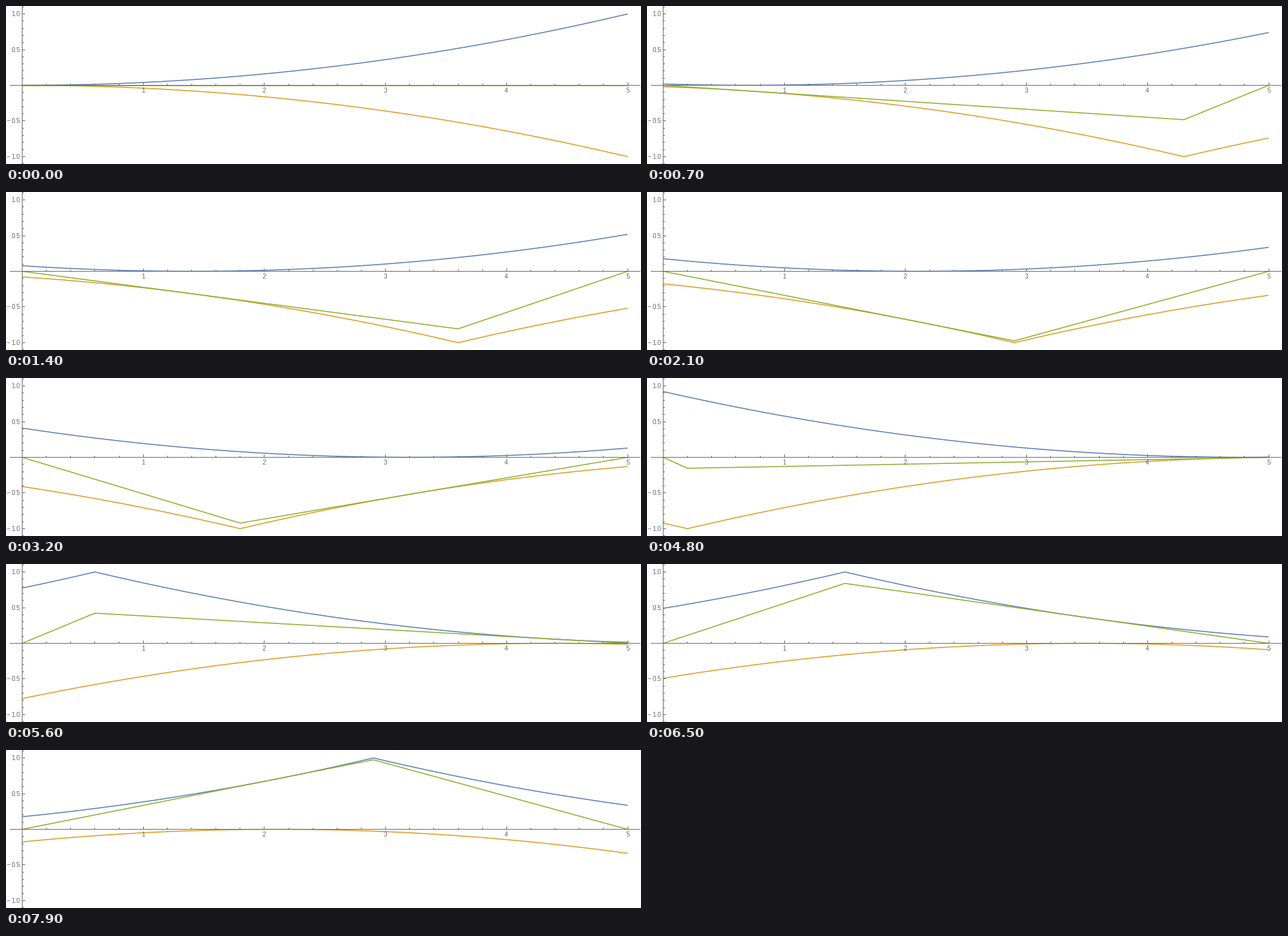
Animation of 1000x250 px, one loop 8 s. Source, as a matplotlib script:

```python
import numpy as np
import matplotlib.pyplot as plt
from matplotlib.animation import FuncAnimation

W, H, DPI = 1000, 250, 100
FRAMES, INTERVAL = 80, 100
LENGTH = 5
X0, Y0, XUNIT, YUNIT = 25.5, 125.5, 190.7, 112.9
PX = 72 / DPI
GREY = "#666666"
COLORS = ["#5e81b5", "#e19c24", "#8fb032"]  # right-going, left-going, sum

fig = plt.figure(figsize=(W / DPI, H / DPI), dpi=DPI, facecolor="white")
ax = fig.add_axes([0, 0, 1, 1])
ax.set_xlim(0, W)
ax.set_ylim(H, 0)
ax.axis("off")


def px(x):
    return X0 + XUNIT * x


def py(y):
    return Y0 - YUNIT * y


def mid(v):
    """Centre of the pixel holding v, for crisp hairlines."""
    return np.floor(v) + 0.5


def hairline(xs, ys):
    ax.plot(xs, ys, color=GREY, lw=PX, solid_capstyle="butt", snap=False, zorder=3)


def label(x, y, text, ha):
    ax.text(x, y, text, ha=ha, va="baseline", color=GREY, zorder=4,
            family="Liberation Sans", fontsize=10 * PX)


def draw_axes():
    hairline([6, 999], [mid(Y0)] * 2)
    hairline([mid(X0)] * 2, [0, H])
    for i in range(1, 26):
        major = i % 5 == 0
        x = mid(px(i / 5))
        hairline([x, x], [121 if major else 123, 125])
        if major:
            label(x - 0.5, 137, str(i // 5), "center")
    for i in range(-11, 12):
        if i == 0:
            continue
        major = i % 5 == 0
        y = mid(py(i / 10))
        hairline([26, 30 if major else 28], [y, y])
        if major:
            label(22.5, y + 3.5, f"{abs(i) / 10:.1f}", "right")
            if i < 0:
                label(6.5, y + 3.5, "\u2212", "right")


def wave(u):
    """Parabola (u/L)^2 repeated with period 2L."""
    u = (u + LENGTH) % (2 * LENGTH) - LENGTH
    return (u / LENGTH) ** 2


draw_axes()
x = np.linspace(0, LENGTH, 501)
curves = [ax.plot([], [], color=c, lw=1.6 * PX, solid_capstyle="butt",
                  solid_joinstyle="round", zorder=2)[0] for c in COLORS]


def update(frame):
    t = frame * INTERVAL / 1000
    right = wave(x - t)
    left = -wave(x + t)
    for curve, y in zip(curves, (right, left, right + left)):
        curve.set_data(px(x), py(y))
    return curves


anim = FuncAnimation(fig, update, frames=FRAMES, interval=INTERVAL,
                     init_func=lambda: update(0), repeat=True, repeat_delay=0)
plt.show()
```
